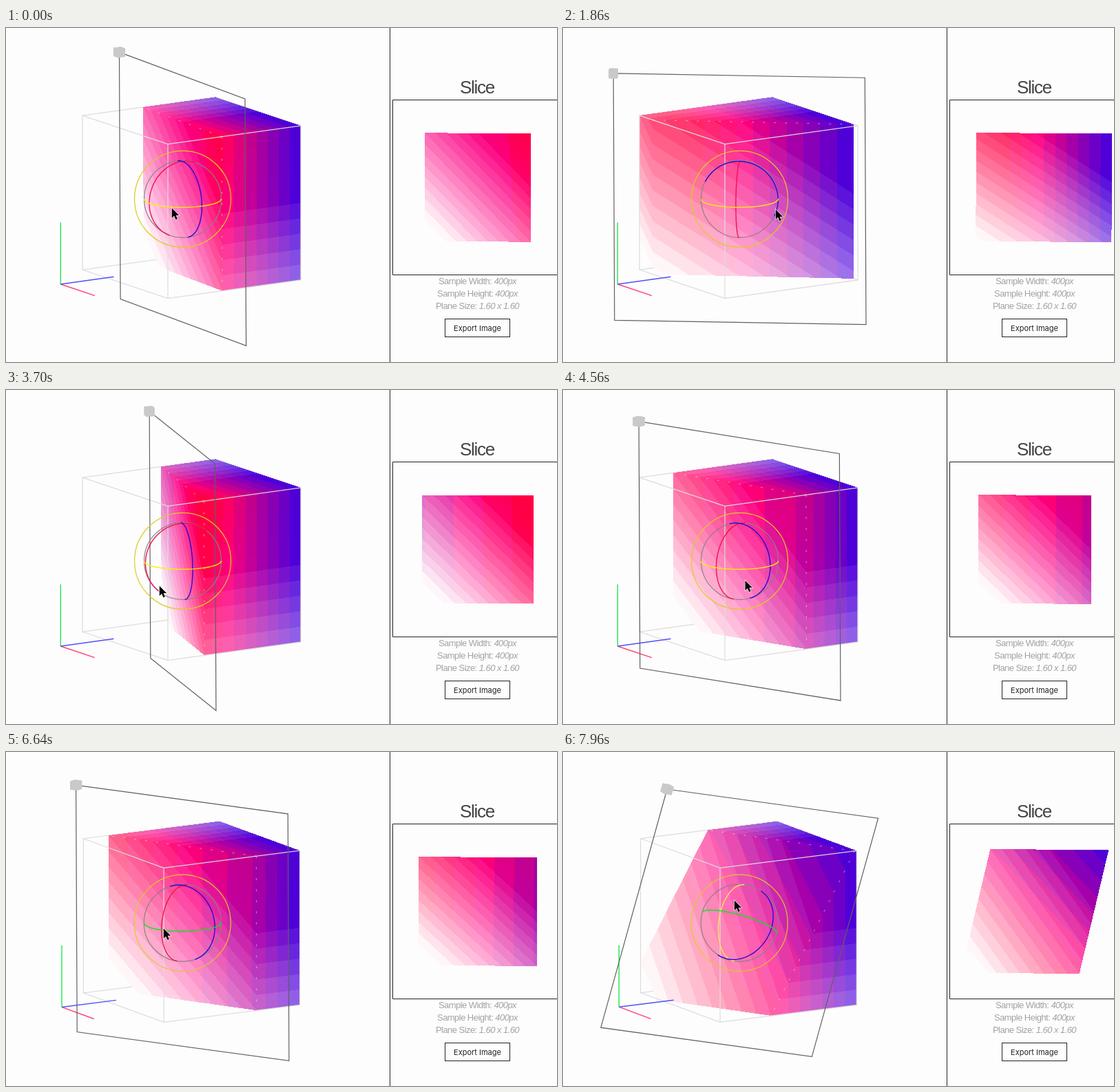
Write an HTML page with a canvas that moves like this. It is 800 by 485 pixels and loops after 8000 ms.

```html
<!DOCTYPE html>
<html lang="en">
<head>
<meta charset="utf-8">
<title>Slice</title>
<style>
html, body { margin: 0; width: 100%; height: 100%; overflow: hidden; background: #fdfdfd; }
canvas, svg { position: absolute; left: 0; top: 0; }
text { text-anchor: middle; font-family: "Liberation Sans", Arial, sans-serif; }
.title { font-size: 26px; letter-spacing: -1.3px; fill: #444; }
.info { font-size: 13px; letter-spacing: -.55px; fill: #a2a2a2; }
.info tspan { font-style: italic; }
.button { font: 11px Inter, sans-serif; fill: #222; }
.frame { fill: none; stroke: #222; }
</style>
</head>
<body>
<canvas id="view" width="800" height="485"></canvas>
<svg width="800" height="485">
  <path class="frame" d="M557.5 0V485M561.5 104.5h247v254h-247z"/>
  <rect class="frame" x="637.5" y="422.5" width="94" height="26"/>
  <text class="title" x="684" y="95">Slice</text>
  <text class="info" x="684.5" y="372">Sample Width: <tspan>400px</tspan></text>
  <text class="info" x="684.5" y="390">Sample Height: <tspan>400px</tspan></text>
  <text class="info" x="684.5" y="408">Plane Size: <tspan>1.60 x 1.60</tspan></text>
  <text class="button" x="684.5" y="440">Export Image</text>
</svg>
<script>
const ctx = document.getElementById('view').getContext('2d');
const image = ctx.createImageData(800, 485);
const LOOP = 8000, SCALE = 229.4, SIN_E = .2156, COS_E = .9765, ROLL = .0045;
const MID = [269.5, 246.5], CENTER = [0, 0, -.067], HALF = .8;

// Keyframes: [time, value, ...]
const YAW = [[0, -2.9], [660, -2.9], [1420, 43.8], [1540, 46], [1720, 52], [1860, 51.5], [1940, 51.5],
  [2260, 17.4], [2350, 13], [2840, -12.8], [2960, -12.8], [3140, -17.7], [3260, -20], [3450, -24.7],
  [3700, -17.7], [3820, -17.7], [4000, 8.8], [4180, 15.4], [4330, 17], [5110, 26.4]];
const TILT = [[6760, 0], [7230, 30.2], [7320, 30.2], [7580, 8], [7670, 0], [7960, -28.9]];
const ORBIT = [[5940, 57.28], [6760, 59.8]];
const CURSOR = [[0, 240, 261], [660, 240, 261], [1420, 301, 262], [1860, 308, 263], [1940, 308, 263],
  [2840, 192, 278], [2960, 192, 278], [3400, 200, 284], [3700, 222, 284], [3820, 222, 284],
  [4180, 258, 279], [5110, 272, 272], [5690, 239, 222], [5990, 239, 222], [6760, 226, 262],
  [7230, 219, 245], [7320, 219, 245], [7670, 230, 236], [7960, 248, 215]];

function track(keys, t) {
  const i = keys.findIndex(k => k[0] > t);
  if (i === 0) return keys[0].slice(1);
  if (i < 0) return keys[keys.length - 1].slice(1);
  const a = keys[i - 1], b = keys[i], f = (t - a[0]) / (b[0] - a[0]);
  return a.slice(1).map((v, j) => v + (b[j + 1] - v) * f);
}

const rad = d => d * Math.PI / 180;
const clamp = v => Math.max(0, Math.min(1, v));
const dot = (a, b) => a[0] * b[0] + a[1] * b[1] + a[2] * b[2];
// base + vector * factor + ...
function combine(base, ...terms) {
  const p = base.slice();
  for (const [v, k] of terms) for (let i = 0; i < 3; i++) p[i] += v[i] * k;
  return p;
}

let right, down, toEye;
function setCamera(angle) {
  const c = Math.cos(angle), s = Math.sin(angle);
  right = [c, 0, s];
  down = [SIN_E * s, -COS_E, -SIN_E * c];
  toEye = [COS_E * s, SIN_E, -COS_E * c];
}
const project = p => [MID[0] + SCALE * dot(p, right), MID[1] + SCALE * dot(p, down)];

// The plane's axes, with a slight roll about the viewing direction.
function plane(yaw, tilt) {
  const rolled = (x, z) => [x, ROLL * (.54 * x + .84 * z), z];
  const u = rolled(Math.cos(yaw), Math.sin(yaw)), back = rolled(-u[2], u[0]);
  const low = [ROLL * .54, -1, ROLL * .84];
  const c = Math.cos(tilt), s = Math.sin(tilt), zero = [0, 0, 0];
  return {
    u,
    v: combine(zero, [low, c], [back, s]),
    n: combine(zero, [low, -s], [back, c])
  };
}

// Banded colour field: paleness follows x + y, hue follows z.
function shade(x, y, z, o) {
  let t = x + y + 1;
  if (t < .2) return;
  t = (Math.floor(t * 10) + .5) / 10;
  z = clamp((Math.floor((z + .5) * 12) + .5) / 12);
  const s = clamp((t - .2) * .74);
  const w = z - .27 * (1 - z) * clamp((t - 1.4) / .6);
  const r = z < .45 ? 255 : 255 - 347 * (z - .45);
  const b = w < .2 ? 65 + 25 * w : w < .45 ? 70 + 232 * (w - .2) : 128 + 175 * (w - .45);
  const white = 255 * (1 - s), d = image.data;
  d[o] = white + r * s;
  d[o + 1] = white;
  d[o + 2] = white + b * s;
  d[o + 3] = 255;
}

function paintSolid({ n }) {
  const nv = dot(n, toEye), p = [0, 0, 0];
  for (let py = 95; py < 396; py++) for (let px = 106; px < 433; px++) {
    const a = (px + .5 - MID[0]) / SCALE, b = (py + .5 - MID[1]) / SCALE;
    let near = 9, far = -9, side = 0;
    for (let i = 0; i < 3; i++) {
      p[i] = a * right[i] + b * down[i];
      const mid = -p[i] / toEye[i], span = .5 / Math.abs(toEye[i]);
      near = Math.min(near, mid + span);
      far = Math.max(far, mid - span);
      side += n[i] * (p[i] - CENTER[i]);
    }
    if (nv < 0) near = Math.min(near, -side / nv);
    else far = Math.max(far, -side / nv);
    if (near > far) shade(p[0] + near * toEye[0], p[1] + near * toEye[1], p[2] + near * toEye[2], (py * 800 + px) * 4);
  }
}

function paintSlice({ u, v }) {
  const p = [0, 0, 0];
  for (let py = 105; py < 358; py++) for (let px = 562; px < 800; px++) {
    const a = (px + .5 - 685) / 154.3, b = (py + .5 - 231.5) / 157.8;
    for (let i = 0; i < 3; i++) p[i] = CENTER[i] + a * u[i] + b * v[i];
    if (p.every(c => Math.abs(c) <= .5)) shade(p[0], p[1], p[2], (py * 800 + px) * 4);
  }
}

function trace(points, close) {
  ctx.beginPath();
  for (const p of points) ctx.lineTo(...project(p));
  if (close) ctx.closePath();
}
function line(color, width, points, close) {
  trace(points, close);
  ctx.strokeStyle = color;
  ctx.lineWidth = width;
  ctx.stroke();
}
const corners = y => [[-.5, y, -.5], [.5, y, -.5], [.5, y, .5], [-.5, y, .5]];

function wires() {
  const top = corners(.5), low = corners(-.5), gray = '#dcdcdc';
  ctx.globalCompositeOperation = 'destination-over';
  line(gray, 1.2, [low[0], low[3], low[2]]);
  line(gray, 1.2, [low[3], top[3]]);
  line(gray, 1.2, [top[0], top[3], top[2]]);
  ctx.globalCompositeOperation = 'source-over';
  line(gray, 1.2, [top[0], top[1], top[2], low[2], low[1], low[0]], true);
  line(gray, 1.2, [top[1], low[1]]);
}

// Sparse light marks where the plane meets the top and side faces.
function cutMarks({ n }) {
  const top = corners(.5), low = corners(-.5);
  ctx.setLineDash([3, 13]);
  for (const face of [top, [top[1], top[2], low[2], low[1]]]) {
    const hits = [];
    face.forEach((a, i) => {
      const b = face[(i + 1) % 4];
      const da = dot(n, a) - dot(n, CENTER), db = dot(n, b) - dot(n, CENTER);
      if (da * db < 0) hits.push(combine(a, [a, -da / (da - db)], [b, da / (da - db)]));
    });
    if (hits.length === 2) line('rgba(255,255,255,.5)', 1, hits);
  }
  ctx.setLineDash([]);
}

function outline({ u, v, n }) {
  const at = (i, j) => combine(CENTER, [u, i * HALF], [v, j * HALF]);
  line('#606060', 1.2, [at(-1, -1), at(1, -1), at(1, 1), at(-1, 1)], true);
  const grip = at(-1, -1), h = .027;
  ctx.fillStyle = '#c9c9c9';
  for (const [a, b, c] of [[u, v, n], [v, n, u], [n, u, v]]) for (const k of [-h, h]) {
    trace([[-h, -h], [h, -h], [h, h], [-h, h]].map(([i, j]) => combine(grip, [a, i], [b, j], [c, k])), true);
    ctx.fill();
  }
}

function axes() {
  const o = [-.6, -.6, -.6];
  line('#ff4070', 1.4, [o, [-.2, -.6, -.6]]);
  line('#20e848', 1.4, [o, [-.6, -.2, -.6]]);
  line('#5050f8', 1.4, [o, [-.6, -.6, -.2]]);
}

// Only the half of the ring that faces the viewer.
function ring(a, b, color) {
  const r = 56 / SCALE, steps = 96;
  const at = k => combine([0, 0, 0], [a, r * Math.cos(k)], [b, r * Math.sin(k)]);
  ctx.beginPath();
  for (let i = 0; i < steps; i++) {
    const p = at(i * 2 * Math.PI / steps), q = at((i + 1) * 2 * Math.PI / steps);
    if (dot(p, toEye) + dot(q, toEye) < 0) continue;
    ctx.moveTo(...project(combine(CENTER, [p, 1])));
    ctx.lineTo(...project(combine(CENTER, [q, 1])));
  }
  ctx.strokeStyle = color;
  ctx.lineWidth = 1.4;
  ctx.stroke();
}

function gizmo({ u, v, n }, t) {
  const [x, y] = project(CENTER);
  for (const [r, color] of [[70, '#dccb22'], [56, '#8c8088']]) {
    ctx.beginPath();
    ctx.arc(x, y, r, 0, 7);
    ctx.strokeStyle = color;
    ctx.lineWidth = 1.2;
    ctx.stroke();
  }
  ring(v, n, t > 6760 ? '#ffe45c' : '#f4104c');
  ring(u, v, '#2a08d8');
  ring(u, n, t < 5160 ? '#fff000' : '#08e81c');
}

const arrow = new Path2D('M0 0V16L3.7 12.6L6.3 18.6L9 17.4L6.5 11.6H11.5Z');
function cursor(t) {
  const [x, y] = track(CURSOR, t);
  ctx.save();
  ctx.translate(x + .8, y + .5);
  ctx.scale(.9, .9);
  ctx.strokeStyle = '#fff';
  ctx.lineWidth = 1.4;
  ctx.stroke(arrow);
  ctx.fillStyle = '#000';
  ctx.fill(arrow);
  ctx.restore();
}

function draw(now) {
  const t = now % LOOP;
  setCamera(rad(track(ORBIT, t)[0]));
  const cut = plane(rad(track(YAW, t)[0]), rad(track(TILT, t)[0]));
  image.data.fill(0);
  paintSolid(cut);
  paintSlice(cut);
  ctx.putImageData(image, 0, 0);
  wires();
  cutMarks(cut);
  axes();
  outline(cut);
  gizmo(cut, t);
  cursor(t);
  requestAnimationFrame(draw);
}
draw(0);
</script>
</body>
</html>
```
